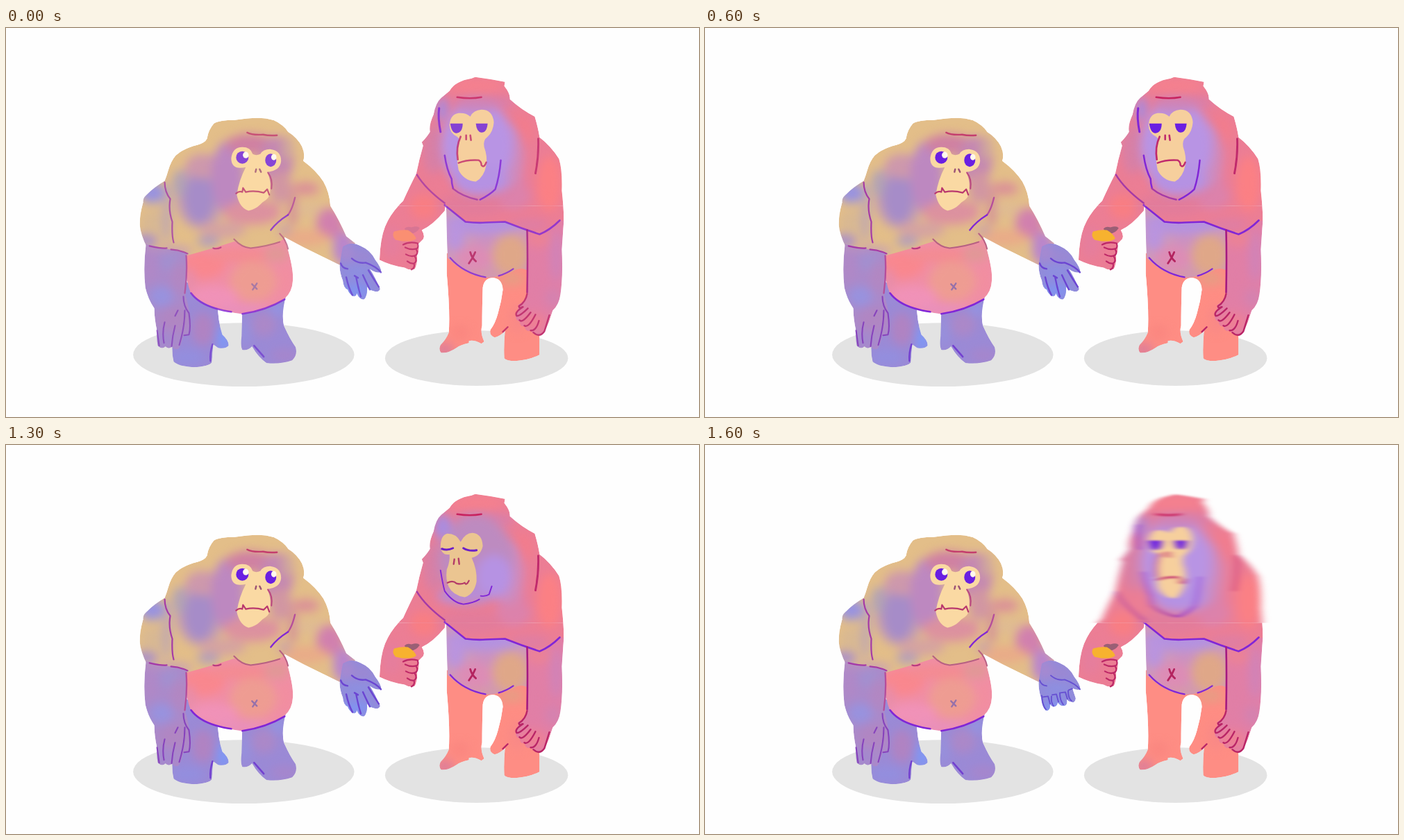
An HTML page that plays this animation: 998 by 561 pixels, repeating every 1700 ms.

```html
<!DOCTYPE html>
<html lang="en">
<head>
<meta charset="utf-8">
<title>Two apes</title>
<style>
  html, body { margin: 0; width: 100%; height: 100%; overflow: hidden; background: #fefefe; }
  svg { display: block; width: 100%; height: 100%; }
  .ink { fill: none; stroke-linecap: round; stroke-linejoin: round; opacity: var(--ink); }
  .eye { fill: #6a1fe2; opacity: var(--ink); }
</style>
</head>
<body>
<svg id="stage" viewBox="0 0 1000 562" preserveAspectRatio="none" xmlns="http://www.w3.org/2000/svg"></svg>
<script>
const STEP = 100, STEPS = 17;
const VIOLET = '#8126d6', PLUM = '#a53aa6', ROSE = '#c02a6c';
const stage = document.getElementById('stage');
const defs = [];

const fill = (d, color, id = '') => `<path id="${id}" d="${d}" fill="${color}"/>`;
const ink = (color, width, ...ds) =>
  `<path class="ink" d="${ds.join('')}" stroke="${color}" stroke-width="${width}"/>`;
const group = (id, ...items) => `<g id="${id}">${items.join('')}</g>`;
const blob = ([x, y, rx, ry, color]) =>
  `<ellipse cx="${x}" cy="${y}" rx="${rx}" ry="${ry}" fill="${color}"/>`;
const soft = blobs => `<g filter="url(#soft)">${blobs.map(blob).join('')}</g>`;
const oval = (x, y, rx, ry, color) => blob([x, y, rx, ry, color]);

// A flat shape with soft paint kept inside its edge.
function part(id, d, base, blobs, extra = '') {
  defs.push(`<clipPath id="${id}Clip"><path d="${d}"/></clipPath>`);
  return `<g id="${id}" clip-path="url(#${id}Clip)">${fill(d, base)}${soft(blobs)}${extra}</g>`;
}

function leftApe() {
  const legs = part('legsL',
    'M250 360L305 395Q306 425 312 443Q322 452 321 459Q316 464 306 462L299 457Q298 470 297 483Q293 489 270 490Q250 489 242 482Q239 470 240 455L240 400Z' +
    'M341 405L404 388Q397 412 401 430Q410 450 418 461Q421 473 413 480Q396 486 376 484Q364 476 355 460Q348 467 341 465Q338 460 340 445Z',
    '#9b8ad6', [
      [284, 435, 16, 24, '#b083c2'], [262, 476, 24, 12, '#938ede'], [314, 450, 9, 22, '#7d98f6'],
      [372, 428, 18, 18, '#ab88c8'], [345, 440, 8, 22, '#9690dc'], [402, 473, 20, 10, '#a686cc'],
      [392, 405, 12, 12, '#9492e0']
    ]);
  const trunk = part('trunkL',
    'M300 138Q308 133 330 133Q350 130 362 130Q385 129 399 141Q404 145 407 150Q420 158 427 171Q432 182 429 192Q448 206 458 222Q467 238 468 257Q481 278 491 301L504 311L483 343Q460 332 430 317L402 302L400 330L262 340L204 318Q194 298 193 284Q193 268 198 252Q197 246 203 241Q214 230 229 221Q232 213 234 206Q238 192 245 184Q258 173 276 169Q287 166 290 160Q292 147 300 138Z',
    '#e3be89', [
      [280, 242, 36, 48, '#c49db0'], [279, 246, 22, 36, '#a68cc8'], [250, 225, 10, 20, '#b2a3b4'],
      [285, 200, 26, 18, '#cd98ac'], [320, 215, 24, 52, '#bd88c0'], [352, 168, 34, 15, '#cf80a2'],
      [390, 190, 25, 34, '#c487b2'], [405, 174, 9, 18, '#cda3a0'], [355, 266, 42, 18, '#dc919f'],
      [396, 230, 16, 24, '#d196a2'], [312, 292, 34, 12, '#d5a3a0'], [211, 238, 18, 15, '#9892e0'],
      [213, 282, 18, 20, '#d8b892'], [232, 268, 6, 45, '#bea6b2'], [201, 308, 18, 10, '#ab90c8'],
      [292, 308, 16, 8, '#b39fba'], [432, 232, 20, 9, '#da8f98'], [414, 262, 6, 24, '#d0889a'],
      [440, 262, 24, 10, '#dfbb92'], [468, 282, 20, 22, '#d180ae'], [432, 303, 34, 12, '#e9ab88'],
      [488, 318, 16, 25, '#b985cc'], [402, 292, 10, 9, '#cda4a4'], [245, 322, 24, 7, '#c8a2b2']
    ]);
  const belly = part('bellyL',
    'M260 329Q300 318 330 308Q345 319 360 317Q385 316 402 304Q415 345 414 364Q413 382 402 391Q375 410 340 413Q295 408 267 384Q257 360 260 329Z',
    '#f08ea6', [
      [285, 342, 32, 20, '#f9878e'], [340, 328, 50, 11, '#f38b92'], [390, 326, 18, 12, '#e09896'],
      [357, 366, 34, 30, '#ee9c92'], [300, 388, 36, 15, '#f092b8'], [342, 406, 40, 8, '#e890bd'],
      [404, 365, 7, 25, '#f28e9e'], [266, 365, 6, 20, '#e58dac']
    ]);
  const forearm = part('armL',
    'M202 312Q230 319 261 325Q263 350 259 386Q264 400 266 422Q267 438 264 443L256 445Q252 462 248 464Q241 465 240 460Q235 465 230 460Q225 465 219 459Q217 450 218 438Q214 420 214 405Q205 392 201 375Q198 345 202 312Z',
    '#ab8aca', [
      [238, 338, 16, 13, '#a190d0'], [208, 345, 10, 24, '#b088c6'], [250, 360, 12, 24, '#b287c2'],
      [224, 388, 18, 15, '#9892de'], [243, 420, 22, 18, '#b086c2'], [228, 450, 14, 12, '#a289ce'],
      [220, 316, 26, 5, '#bf94ba']
    ]);
  const openD = 'M486 316Q498 307 512 315Q526 321 533 335Q541 345 542 353Q534 355 525 348Q533 360 540 377Q538 383 530 380Q525 379 521 374Q522 386 517 392Q510 393 506 383Q506 389 500 387Q495 384 493 378Q487 376 486 365Q480 350 482 338Z';
  const fistD = 'M486 316Q498 307 512 315Q526 321 533 335Q541 345 542 353Q536 355 530 351L535 366Q534 374 528 371Q524 371 522 367Q524 377 517 377Q512 377 509 372Q508 379 502 378Q499 377 498 374Q499 384 492 384Q486 378 485 366Q480 350 482 338Z';
  const handPaint = [[490, 324, 12, 16, '#a689d0'], [515, 330, 15, 10, '#9c88d2'],
    [508, 352, 20, 10, '#8d8fe0'], [505, 380, 22, 10, '#8093f0']];
  const thumb = 'M499 333Q508 341 519 339Q535 345 541 353M483 340Q485 347 493 348';
  const openHand = group('open',
    part('openL', openD, '#928bda', handPaint),
    ink('#6b45d2', 2.4, thumb, 'M491 360Q494 375 500 386M505 359Q508 375 512 388M515 357Q521 370 525 378M523 350Q530 362 538 374M503 358L508 361'));
  const fist = group('fist',
    part('fistL', fistD, '#928bda', handPaint),
    ink('#6650d2', 1.9, thumb, 'M486 362Q487 377 492 382M488 364L495 363L498 374M500 363Q499 372 503 377M501 361L507 360L510 371M512 358Q512 369 517 375M513 358L520 357L523 367M524 355Q524 366 529 370M525 354L530 352'));
  const face = [
    fill('M346 201Q325 206 325 188Q327 172 341 172Q353 172 356 182Q361 185 367 182Q371 175 381 175Q397 177 397 192Q396 206 377 208Q383 220 381 237Q381 246 370 252Q361 262 350 264Q337 260 333 241Q336 220 346 201Z', '#fad9a3'),
    '<ellipse class="eye" cx="341" cy="187" rx="9" ry="9"/><ellipse class="eye" cx="382" cy="191" rx="8" ry="9.5"/>',
    oval(346, 183.5, 4.2, 4.6, '#fff8ee'), oval(386.5, 186.5, 3.8, 4.5, '#fff8ee'),
    ink('#9c5375', 2.4, 'M361 204L360 208M366 204L368 208'),
    ink('#b9386e', 2.2, 'M332 239Q337 235 341 237L342 231L346 237Q358 234 372 238L377 233L380 241'),
    ink('#bb497f', 2.2, 'M378 209Q385 218 383 232')
  ].join('');
  const lines = [
    ink(PLUM, 2.2, 'M229 223Q229 237 237 247Q234 263 240 280Q239 300 242 310'),
    ink(PLUM, 2.2, 'M207 315Q225 319 232 318M238 320Q252 321 262 326'),
    ink('#b54d9b', 2.3, 'M260 329Q262 355 258 383M417 245Q413 262 407 270'),
    ink(VIOLET, 2.2, 'M407 270Q391 280 382 292'),
    ink('#b76083', 2, 'M329 305Q340 317 353 318Q378 315 395 309M395 297Q404 306 407 319'),
    ink('#b83a80', 2.2, 'M299 318Q304 320 310 317'),
    ink('#c43d6d', 2.4, 'M348 151Q355 155 371 154Q380 156 391 155'),
    ink(VIOLET, 2.7, 'M267 383Q278 398 302 405Q315 409 325 410M341 413Q375 408 402 392'),
    ink('#9671aa', 2.4, 'M355 370L362 377M362 369L356 378'),
    ink('#7340d0', 2.5, 'M358 459L372 475M298 457Q294 470 295 481'),
    ink('#8743bc', 2.1, 'M256 388Q256 402 264 412Q267 433 264 443L257 444M229 425Q225 440 228 455M244 430Q240 445 239 460M258 408Q258 432 250 458M248 408L244 416M218 437L221 459')
  ].join('');
  return legs + trunk + belly + forearm + openHand + fist + face + lines;
}

function turnedFace() {
  return fill('M656 140Q663 127 673 127Q687 128 688 146Q685 160 672 163Q680 180 679 197Q676 215 662 220Q645 217 639 205Q634 195 636 180Q641 168 640 158Q629 160 627 148Q627 130 637 128Q650 128 656 140Z', '#ebc591') +
    ink('#6c20c8', 3, 'M629 150Q637 153 645 149M660 149Q668 154 679 152') +
    ink('#b33b68', 2.4, 'M647 165L646 172M653 164L654 172') +
    ink('#b33b68', 2.2, 'M637 199Q645 195 650 200Q657 202 662 199Q664 204 668 196') +
    ink(VIOLET, 1.9, 'M627 181Q630 200 633 211Q645 228 660 230Q675 228 683 223M685 218Q693 219 697 216L701 204');
}

function rightApe() {
  const legs = part('legsR',
    'M636 325L752 325L770 440L770 472Q755 480 735 481Q722 481 719 477Q718 460 720 438Q712 446 705 447Q697 444 699 436Q706 427 710 412Q715 395 717 378Q716 362 703 361Q690 361 688 375Q687 405 687 430Q684 440 690 453L686 456Q675 450 668 452L668 455Q655 458 650 462Q638 470 628 469Q624 465 627 458Q635 450 639 440Q641 410 636 355Z',
    '#fe8d84', [[633, 465, 13, 10, '#da7d9a'], [655, 440, 12, 9, '#f9857f'], [730, 362, 18, 10, '#e79c84'], [738, 420, 10, 20, '#f88887']]);
  const belly = part('bellyR',
    'M635 250L755 275L752 350Q742 345 732 351Q715 360 691 361Q663 357 637 332Z',
    '#cf99ba', [[690, 282, 58, 16, '#b492e0'], [648, 300, 14, 22, '#b994de'], [675, 333, 26, 19, '#dd8cb5'],
      [692, 308, 18, 8, '#cc90c0'], [728, 328, 26, 30, '#dfa788'], [690, 357, 22, 5, '#d798a2']]);
  const trunk = part('trunkR',
    'M640 91Q648 77 672 73L677 71Q700 74 720 78L719 84Q728 95 727 103Q745 119 763 128Q768 145 770 158Q786 170 798 189Q803 205 802 235Q805 260 805 280Q785 299 770 298Q745 290 722 280L664 281Q648 269 634 256L633 264Q616 285 600 292Q605 300 602 305L594 313Q598 320 593 328Q594 340 590 348Q583 351 575 346Q555 343 539 335Q540 305 547 287Q555 267 573 250Q583 228 592 211Q596 190 602 170L600 165Q608 157 612 150Q610 140 617 125Q620 108 628 101Z',
    '#ec7e95', [
      [680, 84, 40, 12, '#f4808e'], [690, 108, 45, 10, '#d97faa'], [630, 118, 9, 18, '#aa8adc'],
      [618, 175, 16, 36, '#d780a6'], [600, 220, 12, 20, '#ea7d94'], [603, 258, 20, 18, '#f87e83'],
      [557, 310, 13, 25, '#e57e9d'], [575, 335, 20, 10, '#ea7d95'], [672, 256, 52, 16, '#e27c9b'],
      [733, 235, 26, 28, '#dc82ab'], [746, 150, 14, 23, '#f27c8c'], [760, 200, 14, 40, '#ea7d96'],
      [784, 225, 18, 40, '#fb8084'], [755, 285, 30, 9, '#de7ea4'], [725, 185, 22, 45, '#ce8cbf']
    ],
      group('tintFront', soft([[680, 170, 52, 66, '#b894e4'], [685, 220, 40, 22, '#b592e3'], [678, 113, 30, 9, '#cb86bc']])) +
      group('tintLeft', soft([[678, 165, 54, 64, '#bd8bc0'], [704, 190, 26, 32, '#b692e3'], [660, 218, 38, 12, '#b78dd6'], [632, 120, 10, 14, '#a98de0']])) +
      group('tintRight', soft([[677, 165, 56, 66, '#c387b7'], [660, 188, 24, 36, '#b790e0'], [680, 222, 34, 10, '#ba8ad0'], [707, 125, 10, 18, '#b98fd8']])));
  const forearm = part('armR',
    'M753 291Q770 299 800 278L805 278L802 320Q804 360 800 385Q798 400 789 408Q784 425 777 440Q772 447 764 443Q758 440 757 437Q750 440 748 431Q742 432 741 424Q734 422 736 413Q740 407 739 400Q750 395 752 384Z',
    '#e27fa6', [[768, 305, 18, 12, '#eb8296'], [794, 330, 9, 38, '#d083b8'], [768, 365, 15, 30, '#e07fa6'], [790, 390, 12, 15, '#d482b0'], [760, 425, 20, 13, '#ee8094']]);
  const front = group('front',
    fill('M670 128Q674 119 686 118Q702 118 704 136Q703 150 695 157Q688 162 690 172Q695 185 693 198Q690 215 678 222Q660 220 653 205Q649 185 653 170Q656 160 651 157Q640 152 640 140Q641 125 653 123Q664 122 670 128Z', '#f6cf9d'),
    '<path class="eye" d="M641 138H659Q659 151 650 152Q643 152 641 138ZM678 138H695Q694 151 686 151Q679 150 678 138Z"/>',
    ink(ROSE, 2.7, 'M656 157Q649 172 652 190'),
    ink(ROSE, 2.6, 'M664 155L664 161M670 155L671 162'),
    ink(ROSE, 2.4, 'M653 195Q665 190 682 191Q686 193 686 198Q690 203 693 194'),
    ink(VIOLET, 2.5, 'M633 184Q636 205 643 218Q643 225 645 231M714 191Q712 215 706 233Q698 241 684 248'),
    ink(PLUM, 2.5, 'M645 232Q658 243 680 248'),
    ink(VIOLET, 3, 'M625 116Q623 130 627 150'));
  const lines = [
    ink('#c8235f', 2.5, 'M651 100Q670 103 686 100'),
    ink(ROSE, 2.9, 'M768 160Q769 185 764 210'),
    ink(PLUM, 2.4, 'M593 212Q605 232 633 253'),
    ink(VIOLET, 2.7, 'M633 256Q648 268 663 280Q680 282 692 281L720 280Q745 290 770 298Q785 292 799 278'),
    ink('#a41980', 2.6, 'M752 292Q753 330 752 382'),
    ink(VIOLET, 2.2, 'M641 332Q660 354 692 360M711 358Q722 355 732 348'),
    ink('#b3245f', 2.8, 'M670 324Q672 332 678 337M677 324Q674 332 668 340'),
    ink('#b92567', 2.4, 'M752 384Q750 396 740 402Q741 406 745 403M746 403Q733 411 737 416Q742 416 753 405M741 422Q745 427 757 411M748 430Q754 434 764 414M757 437Q765 438 769 423M761 440Q770 448 777 438L784 415M717 439L724 432'),
    ink('#bd2867', 2.2, 'M573 313Q582 308 594 311Q596 318 592 319Q584 321 576 317M592 320Q596 326 590 329Q584 331 577 327M590 330Q594 337 589 340Q584 341 579 337M589 341Q590 347 585 349')
  ].join('');
  const lighter =
    fill('M575 290Q578 286 585 288Q594 285 597 289Q592 297 584 297Q577 294 575 290Z', '#9a5f75', 'cap') +
    fill('M560 294Q570 291 580 292Q589 297 592 304Q588 309 572 308L562 306Q556 300 560 294Z', '#f7b22f', 'case');
  return legs + belly + trunk + forearm + lighter + lines + front +
    group('turnLeft', turnedFace()) +
    `<g id="turnRight" transform="translate(1347 0) scale(-1 1)">${turnedFace()}</g>`;
}

const left = leftApe();
const right = rightApe();
stage.innerHTML = `<defs>${defs.join('')}
  <filter id="soft" x="-30%" y="-30%" width="160%" height="160%" color-interpolation-filters="sRGB"><feGaussianBlur stdDeviation="7"/></filter>
  <filter id="smear" filterUnits="userSpaceOnUse" x="500" y="40" width="350" height="460" color-interpolation-filters="sRGB"><feGaussianBlur stdDeviation="6 1.2"/></filter>
  <clipPath id="upper"><rect x="500" width="350" height="257"/></clipPath>
  <clipPath id="lower"><rect x="500" y="257" width="350" height="305"/></clipPath>
  <g id="ape">${right}</g></defs>
  ${oval(343, 472, 159.5, 46, '#e3e3e3')}${oval(679, 477, 132, 40, '#e3e3e3')}
  <g id="leftApe">${left}</g>
  <g clip-path="url(#upper)"><g id="head"><use href="#ape"/></g></g>
  <g clip-path="url(#lower)"><use href="#ape"/></g>`;

const el = id => document.getElementById(id);
const show = (id, on) => el(id).setAttribute('display', on ? 'inline' : 'none');
let last = -1;

function draw(time) {
  const n = Math.floor(time / STEP) % STEPS;
  if (n === last) return;
  last = n;
  const pale = n === 0;
  const closed = n > 2 && (n % 4 === 3 || n % 4 === 0);
  const pose = n === 13 ? 'Left' : n === 15 ? 'Right' : 'Front';
  show('open', !closed);
  show('fist', closed);
  show('front', pose === 'Front');
  for (const side of ['Left', 'Right']) show('turn' + side, pose === side);
  for (const side of ['Front', 'Left', 'Right']) show('tint' + side, pose === side);
  if (n === 14 || n === 16) el('head').setAttribute('filter', 'url(#smear)');
  else el('head').removeAttribute('filter');
  el('case').setAttribute('fill', pale ? '#fa8f72' : '#f7b22f');
  el('cap').setAttribute('fill', pale ? '#d77593' : '#9a5f75');
  stage.style.setProperty('--ink', pale ? 0.8 : 1);
}

function tick() {
  draw(performance.now());
  requestAnimationFrame(tick);
}
tick();
</script>
</body>
</html>
```
